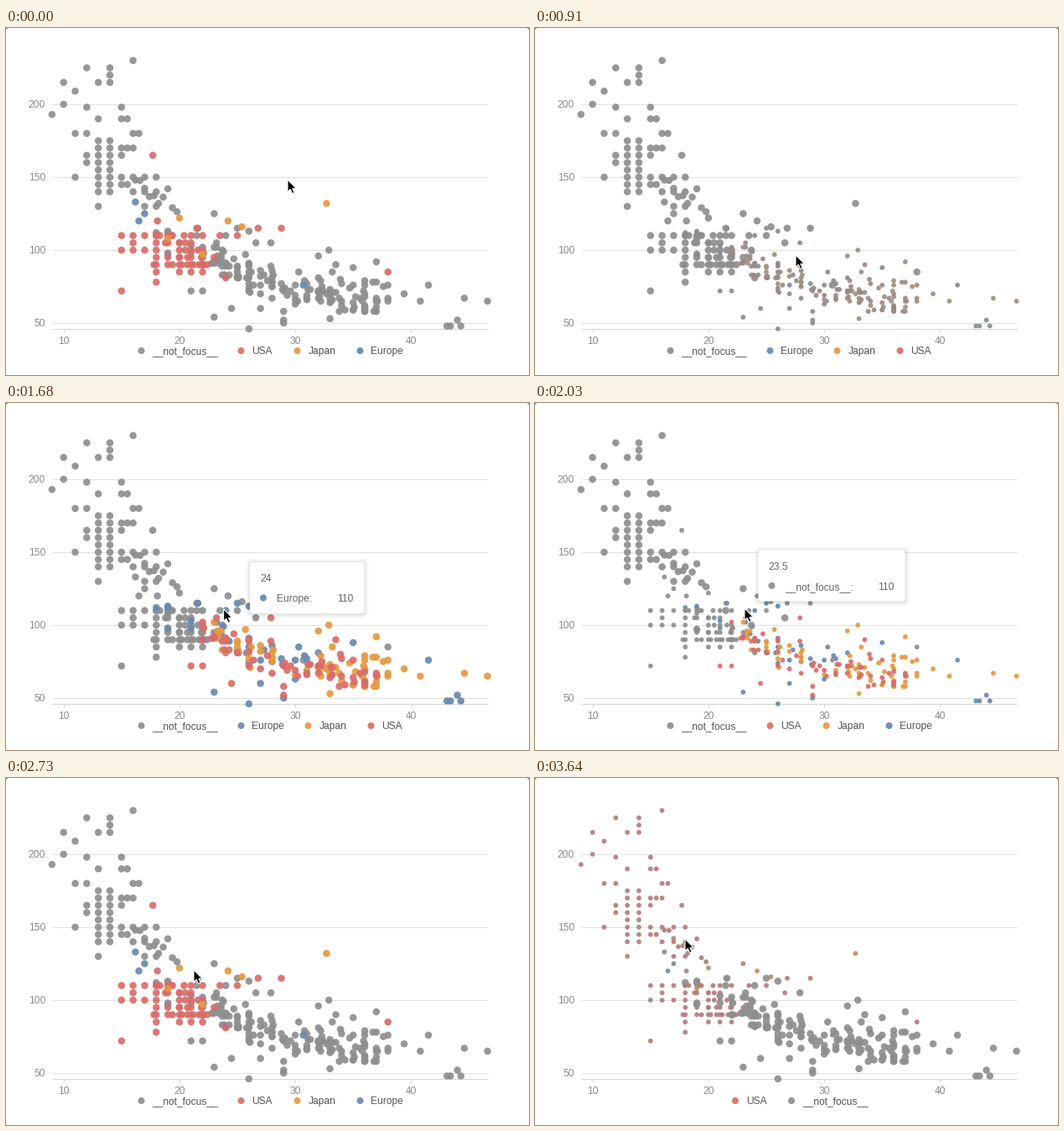
These frames come from a looping animation (624x414 px, 3.71 s). A matplotlib script:

```python
from itertools import product

import numpy as np
import matplotlib.pyplot as plt
from matplotlib.animation import FuncAnimation
from matplotlib.colors import to_rgb
from matplotlib.patches import Circle, FancyBboxPatch, Polygon

W, H, DPI = 624, 414, 96
STEP, FRAMES = 70, 53
MORPH = 300
ALPHA = 0.92
PX = 72 / DPI
OTHER = "__not_focus__"
COLORS = {OTHER: "#8e8e8e", "USA": "#d96c68", "Japan": "#e69840", "Europe": "#6789af"}
NAME_W = {OTHER: 77, "USA": 25, "Japan": 33, "Europe": 38}

rng = np.random.default_rng(7)
points = []  # mpg, horsepower, cylinders, origin


def add(cyl, origin, pairs):
    points.extend((x, hp, cyl, origin) for x, hp in pairs)


def cloud(n, lo, hi):
    """Cars along the falling trend, about half of them at a whole mpg."""
    for x in rng.uniform(lo, hi, n):
        x = round(x) if rng.random() < 0.55 else round(x, 1)
        hp = 60 + 34 * np.exp((23 - x) / 9) + rng.normal(0, 7)
        yield x, round(max(hp, 58))


def add_eights():
    add(8, "USA", product((13, 14), range(140, 180, 5)))
    add(8, "USA", product(range(15, 19), (150,)))
    add(8, "USA", product((15, 15.5), (145, 170, 190)))
    add(8, "USA", product((16, 17, 18), (140,)))
    add(8, "USA", product((13, 17, 18), (130,)))
    add(8, "USA", product((11, 12, 16, 16.5), (180,)))
    add(8, "USA", product((10, 13, 14), (215,)))
    add(8, "USA", product((12, 14), (225,)))
    add(8, "USA", product((12, 15), (165, 198)))
    # loose tail towards better economy
    add(8, "USA", ((16.2 + 0.4 * k, 148 - 2 * k + rng.normal(0, 6)) for k in range(10)))
    add(8, "USA", [(9, 193), (10, 200), (11, 150), (11, 209), (12, 160), (13, 190),
                   (14, 220), (16, 170), (16, 230), (23, 125), (26.6, 105)])


def add_sixes():
    add(6, "USA", product((15, 16, 17), (100, 110)))
    block = product(range(18, 23), range(85, 115, 5))
    add(6, "USA", (p for p in block if rng.random() < 0.8))
    add(6, "USA", ((round(x, 1), 5 * round(hp / 5)) for x, hp in
                   zip(rng.uniform(17.5, 22.5, 22), rng.uniform(85, 112, 22))))
    add(6, "USA", [(15, 72), (16, 105), (17.7, 165), (18, 78), (18.1, 120), (21.5, 115),
                   (23, 95), (23.5, 110), (24, 81), (25, 110), (26.8, 115),
                   (28.8, 115), (38, 85)])
    add(6, "Japan", [(19, 108), (20, 122), (22, 97), (24.2, 120), (25.4, 116),
                     (32.7, 132)])
    add(6, "Europe", [(16.2, 133), (16.5, 120), (17, 125), (30.7, 76)])


def add_fours():
    add(4, "Europe", cloud(30, 19, 32))
    add(4, "Japan", cloud(62, 23, 39))
    add(4, "USA", cloud(58, 21, 37))
    add(4, "Europe", [(18, 112), (21.6, 115), (23, 54), (24, 110), (25, 115), (26, 46),
                      (26, 113), (27, 60), (29, 50), (35, 88), (41.5, 76), (43.1, 48),
                      (43.4, 48), (44, 52), (44.3, 48)])
    add(4, "Japan", [(32, 96), (32.9, 100), (33, 53), (37, 92), (39.4, 70), (40.8, 65),
                     (44.6, 67), (46.6, 65)])
    add(4, "USA", [(21, 72), (22, 72), (23.2, 105), (24.5, 60), (27.9, 105), (29, 52),
                   (33.5, 90)])


add_eights()
add_sixes()
add_fours()
add(3, "Japan", [(19, 97), (21.5, 110), (23.7, 100)])


def sx(mpg):
    return 68.7 + 13.82 * (mpg - 10)


def sy(hp):
    return 352 - 1.74 * (hp - 50)


XY = np.array([(sx(p[0]), sy(p[1])) for p in points])

# start ms, focused cylinders, series order
STATES = [(-1000, 6, [OTHER, "USA", "Japan", "Europe"]),
          (200, None, [OTHER]),
          (800, 4, [OTHER, "Europe", "Japan", "USA"]),
          (2005, 6, [OTHER, "USA", "Japan", "Europe"]),
          (3490, 8, ["USA", OTHER])]
SERIES = [[p[3] if p[2] == focus else OTHER for p in points] for _, focus, _ in STATES]

# Pointer path: ms, x, y
POINTER = np.array([(0, 336, 181), (630, 311, 219), (800, 311, 262), (1120, 311, 288),
                    (1600, 262, 246), (2000, 250, 245), (2240, 250, 245),
                    (2730, 224, 229), (3150, 184, 201), (3360, 184, 201),
                    (3500, 179, 192)])
ARROW = np.array([(0, 0), (0, 14.4), (3.3, 11.4), (5.6, 16.6), (8.1, 15.5),
                  (5.9, 10.5), (10.3, 10.3)])

# Tooltips: start, end, fade in, fade out, title, series, value, from, to, arrival
TIPS = [(1400, 1820, 140, 0, "24", "Europe", "110", (400, 284), (291, 190), 1680),
        (1820, 2520, 0, 200, "23.5", OTHER, "110", (291, 190), (264, 174), 2200),
        (3080, 3490, 140, 70, "18.2", OTHER, "135", (203, 221), (203, 221), 3100)]

fig = plt.figure(figsize=(W / DPI, H / DPI), dpi=DPI, facecolor="white")
ax = fig.add_axes([0, 0, 1, 1])
ax.set_xlim(0, W)
ax.set_ylim(H, 0)
ax.axis("off")


def label(x, y, s, color, ha="left", z=1):
    return ax.text(x, y + 4.2, s, color=color, ha=ha, va="baseline", zorder=z,
                   family="Liberation Sans", size=12 * PX)


def line(xs, ys, color):
    ax.plot(xs, ys, color=color, lw=PX, zorder=1, solid_capstyle="butt")


for hp in (50, 100, 150, 200):
    y = round(sy(hp)) - 0.5
    line([55, 575], [y, y], "#e2e2e2")
    label(47, sy(hp), str(hp), "#8a8a8a", "right")
line([55, 575], [358.5, 358.5], "#d4d4d4")
for mpg in (10, 20, 30, 40):
    x = round(sx(mpg)) - 0.5
    line([x, x], [359, 363], "#d4d4d4")
    label(sx(mpg), 373, str(mpg), "#8a8a8a", "center")
for x, d in ((0, 1), (W, -1)):
    ax.add_patch(Polygon([(x, 0), (x + 2.5 * d, 0), (x, 2.5)], fc="#999999", lw=0))

dots = ax.scatter(XY[:, 0], XY[:, 1], lw=0, zorder=3)
pointer = ax.add_patch(Polygon(ARROW, fc="black", ec="white", lw=1.1 * PX, zorder=9))
temporary = []


def keep(artist):
    temporary.append(artist)
    return artist


def dot(x, y, name, z=4, alpha=ALPHA):
    keep(ax.add_patch(Circle((x, y), 4, fc=COLORS[name], alpha=alpha, lw=0, zorder=z)))


def draw_legend(order):
    total = sum(13 + NAME_W[n] for n in order) + 29 * (len(order) - 1) + 4
    x = 315.5 - total / 2 + 4
    for name in order:
        dot(x, 385, name)
        keep(label(x + 13, 385, name, "#555555"))
        x += 42 + NAME_W[name]


def box(x, y, w, h, grow, color, alpha, z):
    keep(ax.add_patch(FancyBboxPatch(
        (x - grow, y - grow), w + 2 * grow, h + 2 * grow, fc=color, lw=0,
        boxstyle=f"round,pad=0,rounding_size={3 + grow}", alpha=alpha, zorder=z)))


def draw_tip(t, tip):
    start, end, fade_in, fade_out, title, name, value, a, b, arrive = tip
    if not start <= t < end:
        return
    alpha = 1.0
    if fade_in:
        alpha = min(alpha, (t - start + STEP) / fade_in)
    if fade_out:
        alpha = min(alpha, (end - t) / fade_out)
    p = 1 - (1 - min(1, (t - start) / (arrive - start))) ** 3
    x, y = np.array(a) + p * (np.array(b) - a)
    w = 98 + NAME_W[name]
    for grow in range(1, 7):
        box(x + 0.3, y + 0.7, w, 61, grow, "black", 0.004 * (8 - grow) * alpha, 6)
    box(x, y, w, 61, 0, "white", alpha, 7)
    texts = [label(x + 12, y + 19, title, "#666666", z=8),
             label(x + 32, y + 43, name + ":", "#666666", z=8),
             label(x + w - 13, y + 43, value, "#666666", "right", 8)]
    for text in texts:
        text.set_alpha(alpha)
        keep(text)
    dot(x + 16, y + 42.5, name, 8, ALPHA * alpha)


def ease(p):
    return 4 * p ** 3 if p < 0.5 else 1 - (2 - 2 * p) ** 3 / 2


def draw_dots(t, i):
    start, _, order = STATES[i]
    new, old = SERIES[i], SERIES[max(i - 1, 0)]
    p = min(1, (t - start) / MORPH)
    mix = ease(p)
    idx = np.argsort([order.index(n) for n in new], kind="stable")
    colors, sizes = [], []
    for k in idx:
        c0, c1 = (np.array(to_rgb(COLORS[s[k]])) for s in (old, new))
        colors.append((*(c0 + mix * (c1 - c0)), ALPHA))
        moving = p < 1 and old[k] != new[k]
        sizes.append(((5.8 if moving else 8.5) * PX) ** 2)
    dots.set_offsets(XY[idx])
    dots.set_facecolors(colors)
    dots.set_sizes(sizes)


def update(n):
    t = n * STEP
    while temporary:
        temporary.pop().remove()
    i = max(k for k, s in enumerate(STATES) if t >= s[0])
    draw_dots(t, i)
    draw_legend(STATES[i][2])
    for tip in TIPS:
        draw_tip(t, tip)
    pos = [np.interp(t, POINTER[:, 0], POINTER[:, c]) for c in (1, 2)]
    pointer.set_xy(ARROW + pos)
    return []


anim = FuncAnimation(fig, update, frames=FRAMES, interval=STEP, init_func=lambda: [],
                     repeat=True, repeat_delay=0, blit=False)
plt.show()
```
